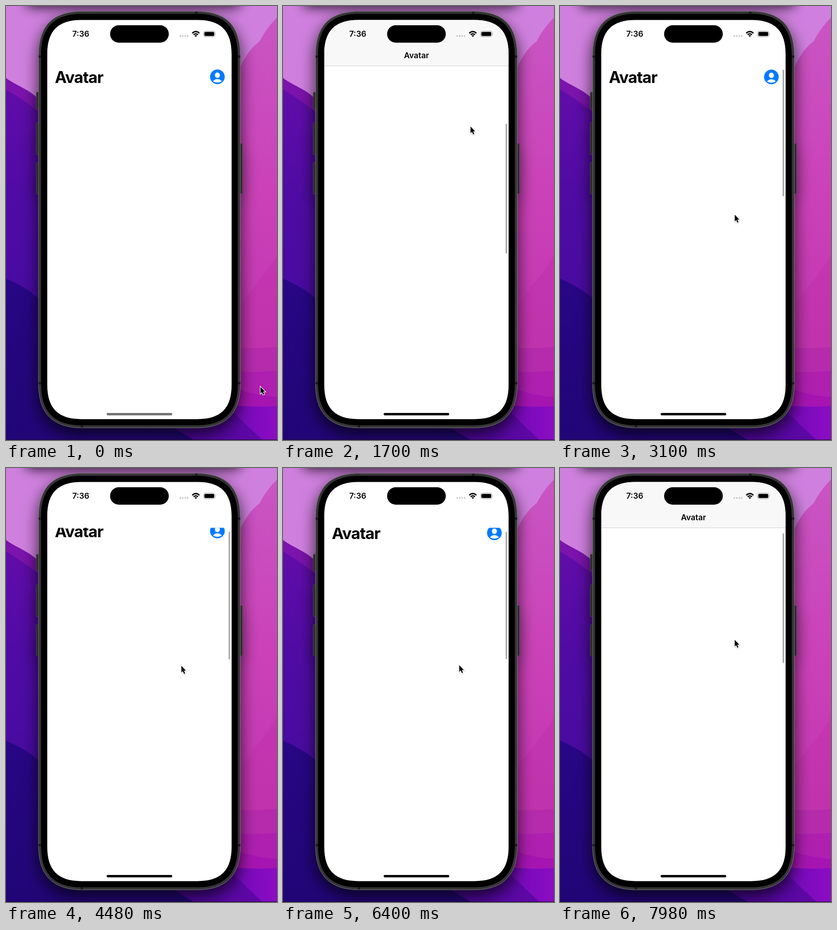
Recreate the animation shown at these times as an HTML page. Size 591 by 947 pixels, loop 8000 ms.

```html
<!DOCTYPE html>
<html lang="en">
<head>
<meta charset="utf-8">
<style>
html, body { margin: 0; width: 100%; height: 100%; overflow: hidden; }
svg { display: block; width: 591px; height: 947px; font-family: Inter, "Liberation Sans", sans-serif; }
</style>
</head>
<body>
<svg viewBox="0 0 591 947">
  <defs>
    <linearGradient id="violet" x2="0" y2="1"><stop stop-color="#610ca9"/><stop offset=".3" stop-color="#4f0ba4"/><stop offset="1" stop-color="#3f0a9c"/></linearGradient>
    <linearGradient id="navy" x2="0" y2="1"><stop stop-color="#280685"/><stop offset="1" stop-color="#210576"/></linearGradient>
    <linearGradient id="pink" x2="0" y2="1"><stop stop-color="#c955c3"/><stop offset=".45" stop-color="#cb42b8"/><stop offset="1" stop-color="#c032ad"/></linearGradient>
    <linearGradient id="floor"><stop stop-color="#4305a0"/><stop offset="1" stop-color="#8c0cc4"/></linearGradient>
    <filter id="shade" x="-20%" y="-10%" width="140%" height="120%"><feDropShadow dx="0" dy="14" stdDeviation="17" flood-opacity=".72"/></filter>
    <filter id="soft" filterUnits="userSpaceOnUse" x="-60" y="-120" width="720" height="240"><feGaussianBlur stdDeviation="14"/></filter>
    <filter id="tiny" x="-50%" y="-50%" width="200%" height="200%"><feDropShadow dx="0" dy="1" stdDeviation="1" flood-opacity=".3"/></filter>
    <clipPath id="screenClip"><path id="clipShape"/></clipPath>
    <clipPath id="belowBar"><rect x="90" y="130.5" width="402" height="760"/></clipPath>
  </defs>

  <!-- wallpaper -->
  <rect width="591" height="947" fill="#cf80de"/>
  <path d="M0 157C25 176 50 180 76 208V300H0Z" fill="#7b13ac"/>
  <path d="M0 182C25 197 48 212 76 236V947H0Z" fill="url(#violet)"/>
  <path d="M0 595C30 608 52 620 80 645L350 905L420 947H0Z" fill="url(#navy)"/>
  <path d="M591 25C574 42 562 60 553 77C530 95 522 112 508 138V850H591Z" fill="url(#pink)"/>
  <path d="M591 544C570 580 540 612 500 668V800H591Z" fill="#bc30a8" opacity=".45"/>
  <path d="M490 746Q550 748 591 744V947H490Z" fill="#b52bac"/>
  <path d="M490 790C520 804 560 797 591 796V947H490Z" fill="#af1fb0"/>
  <path d="M490 830Q540 850 591 853V947H490Z" fill="#a614b2"/>
  <path d="M340 905L500 872Q550 876 591 873V947H410Z" fill="url(#floor)"/>
  <path d="M490 880C515 905 535 925 560 947H410L340 905Z" fill="#4a0596" opacity=".6"/>
  <rect x="45" y="-60" width="466" height="62" rx="8" filter="url(#soft)" opacity=".85"/>
  <rect y="946" width="591" height="1" fill="#1c0830"/>

  <!-- phone -->
  <g filter="url(#shade)">
    <g fill="#2b2a2c" stroke="#4c4a4d" stroke-width=".8">
      <rect x="66" y="188" width="7" height="36" rx="1.5"/>
      <rect x="66" y="255" width="7" height="69" rx="1.5"/>
      <rect x="66" y="342" width="7" height="68" rx="1.5"/>
      <rect x="508" y="300" width="7.5" height="110" rx="1.5"/>
    </g>
    <path id="rim" fill="#343436" stroke="#747475"/>
  </g>
  <path d="M71 110.500h6M505 110.500h6M71 823h6M505 823h6M415 12v6M165.500 914v6" stroke="#1c1c1d" stroke-width="5"/>
  <path id="bezel"/>
  <path id="screen" fill="#fff"/>

  <g clip-path="url(#belowBar)">
    <g id="large">
      <text id="title" y="168" font-size="34.8" font-weight="700" letter-spacing="-1.05">Avatar</text>
      <circle cx="461" cy="154.500" r="16" fill="#007aff"/>
      <ellipse cx="461" cy="151" rx="5.500" ry="6" fill="#fff"/>
      <path d="M451.500 164.200C454 160.800 457.500 159.600 461 159.600S468 160.800 470.500 164.200C468 166 465 167 461 167S454 166 451.500 164.200Z" fill="#fff"/>
    </g>
  </g>
  <g id="bar" clip-path="url(#screenClip)">
    <rect x="90" y="30" width="402" height="100" fill="#f8f8f8"/>
    <rect x="90" y="130" width="402" height="1" fill="#cfcfcf"/>
  </g>
  <text id="inline" x="291" y="114" font-size="17.4" font-weight="600" text-anchor="middle">Avatar</text>

  <!-- status bar -->
  <text x="163" y="67" font-size="17.4" font-weight="600" text-anchor="middle">7:36</text>
  <rect x="227" y="42" width="128" height="38" rx="19"/>
  <path d="M380 65.300h16.500" stroke="#c6c6ca" stroke-width="3.800" stroke-linecap="round" stroke-dasharray="0 5.400"/>
  <g fill="none" stroke="#000" stroke-width="2.700">
    <path d="M406.200 59.500Q414 52 421.800 59.500"/>
    <path d="M409.200 62.800Q414 58.300 418.800 62.800"/>
  </g>
  <path d="M414 67.500L411.200 64.700Q414 62.400 416.800 64.700Z"/>
  <rect x="430.700" y="54.700" width="25.500" height="12.600" rx="4" fill="none" stroke="#a3a3a3"/>
  <rect x="432.500" y="56.500" width="21.700" height="9" rx="2.500"/>
  <path d="M457.500 59Q459 61 457.500 63Z" fill="#a3a3a3"/>

  <rect id="thumb" x="485.500" width="3.200" rx="1.600" fill="#a6a6a6"/>
  <rect id="home" x="219.500" y="888" width="143" height="5.200" rx="2.600"/>
  <path id="cursor" d="M0 0V14.500L3.300 11.500L5.700 17.300L8.100 16.300L5.700 10.500H10Z" stroke="#fff" stroke-width="2.400" paint-order="stroke" filter="url(#tiny)"/>
</svg>
<script>
const LOOP = 8000;
const REST_TOP = 139, REST_LENGTH = 276.5, COLLAPSE = 52;
const $ = id => document.getElementById(id);
const clamp = v => Math.max(0, Math.min(1, v));
const ramp = (v, from, to) => clamp((v - from) / (to - from));
const set = (id, attrs) => {
  for (const name in attrs) $(id).setAttribute(name, attrs[name]);
};

// Rounded rectangle with continuous corners, inset from the phone's outer edge
function outline(inset) {
  const x = 71 + inset, y = 11.5 + inset, w = 440 - 2 * inset, h = 909 - 2 * inset;
  const r = 81 - inset, R = r * 1.2, c = r * .381, k = R - c;
  return `M${x + R} ${y}h${w - 2 * R}c${k} 0 ${R} ${c} ${R} ${R}v${h - 2 * R}c0 ${k} ${-c} ${R} ${-R} ${R}` +
    `h${2 * R - w}c${-k} 0 ${-R} ${-c} ${-R} ${-R}v${2 * R - h}c0 ${-k} ${c} ${-R} ${R} ${-R}Z`;
}
set('rim', { d: outline(0) });
set('bezel', { d: outline(5.5) });
set('screen', { d: outline(19) });
set('clipShape', { d: outline(19) });

// Each stop is a turning point of a drag: [time, value]; motion eases between stops
const pointerX = [[100, 555], [850, 418], [1700, 409], [2700, 381], [6300, 384], [6860, 388], [7980, 381]];
const pointerY = [[100, 831], [850, 640], [950, 635], [1750, 259], [2700, 455.5], [3760, 455.5],
  [5600, 386], [5790, 386], [6860, 459], [7980, 375]];
const scroll = [[950, 0], [1750, 374], [2750, -5], [3160, 0], [3760, 0],
  [5600, 50], [5790, 50], [6860, -11], [7980, 61]];

function sample(stops, t) {
  const i = stops.findIndex(s => s[0] > t);
  if (i < 0) return stops.at(-1)[1];
  if (i === 0) return stops[0][1];
  const [t0, a] = stops[i - 1], [t1, b] = stops[i], u = (t - t0) / (t1 - t0);
  return a + (b - a) * u * u * (3 - 2 * u);
}

function draw(t) {
  const s = sample(scroll, t), over = Math.max(0, -s), past = Math.max(0, s - COLLAPSE);
  const gray = 115 * (1 - ramp(t, 0, 500));
  set('cursor', { transform: `translate(${sample(pointerX, t)} ${sample(pointerY, t)})` });
  set('large', { transform: `translate(0 ${-s})` });
  set('title', { transform: `translate(106.500 168) scale(${1 + over * .001}) translate(0 -168)` });
  set('inline', { opacity: ramp(s, 38, 49) });
  set('bar', { opacity: ramp(s, COLLAPSE, 59) });
  set('thumb', {
    y: REST_TOP + past * .37,
    height: REST_LENGTH - over + Math.max(0, Math.min(s, COLLAPSE)) * .13,
    opacity: ramp(t, 960, 1080)
  });
  set('home', { fill: `rgb(${gray},${gray},${gray})` });
}
function frame(now) {
  draw(now % LOOP);
  requestAnimationFrame(frame);
}
draw(0);
requestAnimationFrame(frame);
</script>
</body>
</html>
```
